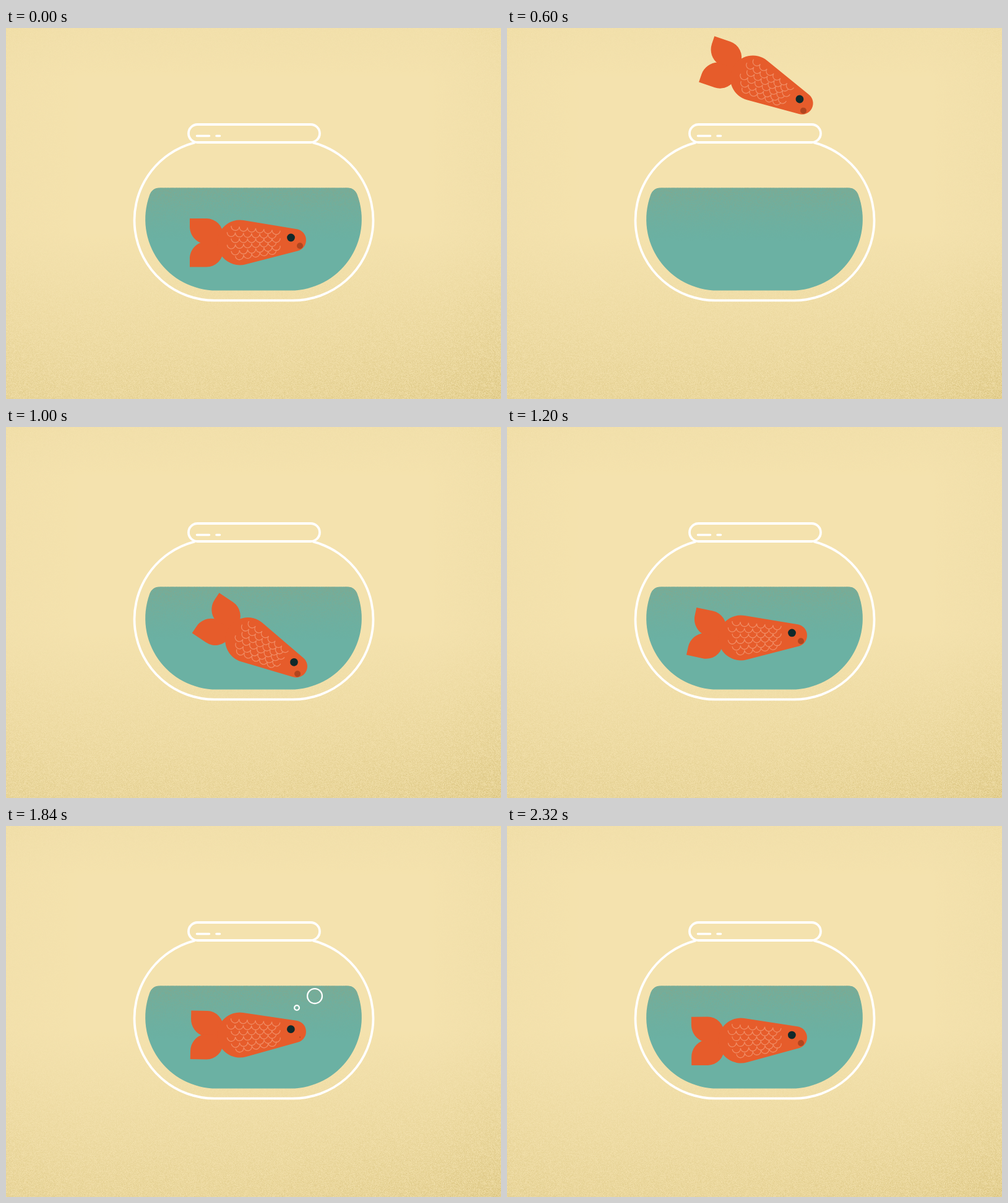
Animation, 800 px wide and 600 px high, one loop 2360 ms. Source, as an HTML page with a canvas:

```html
<!DOCTYPE html>
<html lang="en">
<head>
<meta charset="utf-8">
<title>Jumping goldfish</title>
<style>
  html, body { margin: 0; width: 100%; height: 100%; overflow: hidden; background: #f4e2ae; }
  canvas, svg { position: absolute; left: 0; top: 0; width: 800px; height: 600px; display: block; }
  .glass { fill: none; stroke: #fff; stroke-width: 3.8; stroke-linecap: round; }
  .bubble { fill: none; stroke: #fff; stroke-width: 2.3; }
  .skin { fill: #e65c2b; }
  .scales { fill: none; stroke: #f08b63; stroke-width: 1.3; }
</style>
</head>
<body>
<canvas id="paper" width="800" height="600"></canvas>
<svg viewBox="0 0 800 600">
  <defs>
    <clipPath id="behindLid">
      <path clip-rule="evenodd" d="M0 0H800V600H0Z M309.5 156H492.5A14.5 14.5 0 0 1 492.5 185H309.5A14.5 14.5 0 0 1 309.5 156Z"/>
    </clipPath>
    <path id="lobe" d="M-53 -39.2H-26A27 27 0 0 1 1 -12V1H-33C-44 -2 -53 -13 -53 -26Z"/>
  </defs>
  <g clip-path="url(#behindLid)">
    <g id="fish">
      <g id="tail" class="skin">
        <use href="#lobe"/>
        <use href="#lobe" transform="scale(1 -1)"/>
      </g>
      <path id="body" class="skin"/>
      <path id="scales" class="scales"/>
      <circle cx="82.5" cy="-8" r="6.4" fill="#10292b"/>
      <circle id="mouth" cx="97" cy="5.2" fill="#b0451f"/>
    </g>
  </g>
  <circle class="bubble" id="big"/>
  <circle class="bubble" id="small"/>
  <g class="glass">
    <path d="M304 185.7A129.6 129.6 0 0 0 337.2 440.6H463.8A129.6 129.6 0 0 0 497 185.7"/>
    <rect x="295" y="156" width="212" height="29" rx="14.5"/>
    <path d="M308.5 174.5H328.5M340 174.5H345.5" stroke-width="3.5"/>
  </g>
</svg>
<script>
const LOOP = 2360, STEP = 40, PEAK = 478, SETTLED = 1200;
const $ = id => document.getElementById(id);
const clamp = v => Math.max(0, Math.min(1, v));
const mix = (a, b, u) => a + (b - a) * u;
const ease = (t, from, to) => {
  const u = clamp((t - from) / (to - from));
  return u * u * (3 - 2 * u);
};

// Grainy paper and water
function paint() {
  const W = 800, H = 600, ctx = $('paper').getContext('2d');
  const water = new Path2D('M248 258.5H552C560 258.5 565.5 263 568 270.5A115 115 0 0 1 460 424.5' +
    'H340A115 115 0 0 1 232 270.5C234.5 263 240 258.5 248 258.5Z');
  let seed = 7;
  const rand = () => (seed = (seed * 1664525 + 1013904223) >>> 0) / 4294967296;

  function grain(rgb, density) {
    const layer = document.createElement('canvas');
    layer.width = W; layer.height = H;
    const c = layer.getContext('2d'), img = c.createImageData(W, H);
    for (let y = 0, i = 0; y < H; y++)
      for (let x = 0; x < W; x++, i += 4) {
        img.data.set(rgb, i);
        img.data[i + 3] = 255 * clamp(density(x, y) * (0.3 + 1.4 * rand()));
      }
    c.putImageData(img, 0, 0);
    return layer;
  }

  ctx.fillStyle = '#f4e2ae';
  ctx.fillRect(0, 0, W, H);
  ctx.drawImage(grain([216, 194, 124], (x, y) => {
    const low = clamp((y - 330) / 270), right = clamp((x - 400) / 400);
    const side = clamp((Math.abs(x - 400) - 280) / 120), top = clamp(1 - y / 80);
    return 0.36 * low ** 1.2 + 0.14 * low * right + 0.08 * side * (0.5 + right / 2) + 0.06 * top;
  }), 0, 0);

  ctx.save();
  ctx.fillStyle = '#6bb1a3';
  ctx.fill(water);
  ctx.clip(water);
  ctx.drawImage(grain([134, 166, 138], (x, y) => 0.5 * clamp((345 - y) / 87) ** 1.3), 0, 0);
  ctx.restore();
}

// Hull of two circles: belly at the origin, nose at (nx, ny)
function bodyPath() {
  const R = 36.5, r = 18, nx = 89, ny = -4;
  const axis = Math.atan2(ny, nx), open = Math.acos((R - r) / Math.hypot(nx, ny));
  const on = (cx, cy, rad, a) => (cx + rad * Math.cos(a)).toFixed(2) + ' ' + (cy + rad * Math.sin(a)).toFixed(2);
  const up = axis - open, down = axis + open;
  return `M${on(0, 0, R, up)}L${on(nx, ny, r, up)}A${r} ${r} 0 0 1 ${on(nx, ny, r, down)}` +
    `L${on(0, 0, R, down)}A${R} ${R} 0 1 1 ${on(0, 0, R, up)}Z`;
}

// Staggered rows of cups, converging towards the nose and kept inside the belly
function scalePath() {
  const w = 13.2;
  let d = '';
  for (let row = 0; row < 6; row++) {
    const x = -14 - w / 2 * (row % 2), y = -27 + 10.2 * row, dy = 1.3 - 0.68 * row;
    for (let k = 0; k < 6; k++) {
      const cx = x + w * k, cy = y + dy * k;
      if (cx > 0 || Math.hypot(cx, cy) < 31) d += `M${cx} ${cy}a6.6 6.8 0 0 0 ${w} ${dy}`;
    }
  }
  return d;
}

// Leap in a steep arc while turning from nose-up to nose-down
function flight(t) {
  const fall = Math.min(1, Math.abs(t / PEAK - 1)) ** 2.5;
  return {
    x: 378 + t / 31,
    y: 72 + 275 * fall,
    angle: -52 + 131 * ease(t, 180, 900),
    wag: 12 - 23 * ease(t, 320, 560)
  };
}

// Gentle rocking with a fading wag of the tail
function swim(t) {
  const p = t < PEAK ? 1 : clamp((t - SETTLED) / (LOOP - SETTLED));
  return {
    x: 378,
    y: 347 - 9 * (ease(t, 400, 1700) - ease(t, 1840, 2280)),
    angle: 3 * Math.sin(2 * Math.PI * p),
    wag: 12 * (1 - p) * Math.cos(4.3 * Math.PI * p)
  };
}

// Rises from the mouth, swells and pops
function bubble(el, t, birth, drift, size) {
  const u = (t - birth) / 530, left = 1 - u;
  const alive = u > 0 && u < 1;
  el.setAttribute('cx', 478.5 + drift * u);
  el.setAttribute('cy', 335 - 60 * (1 - left ** 4));
  el.setAttribute('r', alive ? size * (1 - left ** 3) : 0);
}

function draw() {
  const t = Math.floor(performance.now() % LOOP / STEP) * STEP;
  const air = ease(t, 0, 160) - ease(t, 840, 1120);
  const a = swim(t), b = flight(t);
  const pose = key => mix(a[key], b[key], air);
  const stretch = 1 - 0.03 * Math.abs(a.angle);

  $('fish').setAttribute('transform', `translate(${pose('x')} ${pose('y')}) rotate(${pose('angle')})`);
  $('tail').setAttribute('transform', `translate(-28 0.3) rotate(${pose('wag')}) scale(${stretch} 1)`);
  $('mouth').setAttribute('r', 5 - 4 * (ease(t, 1240, 1840) - ease(t, 1900, 2200)));
  bubble($('big'), t, 1405, 25, 12);
  bubble($('small'), t, 1708, -34, 6.7);
  requestAnimationFrame(draw);
}

paint();
$('body').setAttribute('d', bodyPath());
$('scales').setAttribute('d', scalePath());
draw();
</script>
</body>
</html>
```
